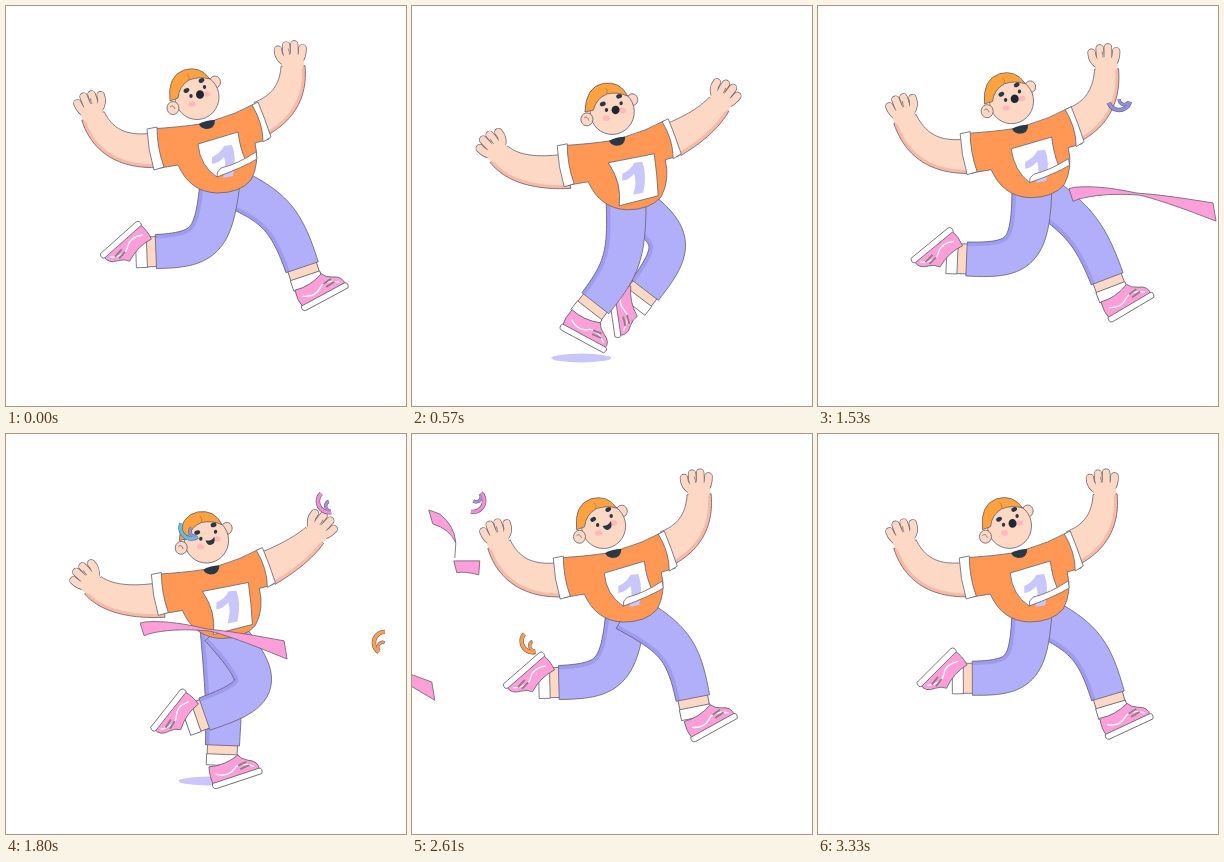
These frames come from a looping animation (400x400 px, 3.36 s). An HTML page with a canvas:

```html
<!DOCTYPE html>
<html lang="en">
<head>
<meta charset="utf-8">
<title>Finish line runner</title>
<style>
html, body { margin: 0; width: 100%; height: 100%; overflow: hidden; background: #fff; }
canvas { display: block; width: 400px; height: 400px; }
</style>
</head>
<body>
<canvas id="stage" width="400" height="400"></canvas>
<script>
const ctx = document.getElementById('stage').getContext('2d');
const LOOP = 3360, STEP = 30, TAU = Math.PI * 2, RAD = Math.PI / 180;
const LINE = '#62606f', SKIN = '#fdd8c5', SKIN_SHADE = '#f8b9a6', ORANGE = '#ff9855',
  HAIR = '#ffa23f', PANTS = '#b1affa', PANTS_SHADE = '#9f9cf0', PINK = '#ff9fda',
  LILAC = '#c9c6fc', NAVY = '#293847';

// Time to steps taken: a fast run, slow motion through the ribbon, then fast again.
const PACE = [[0, 0], [1260, 3.5], [1530, 4.17], [2130, 4.78], [2610, 5.08],
  [3120, 5.45], [3240, 5.7], [3360, 6]];

const mix = (a, b, k) => a + (b - a) * k;
const mixPoint = (a, b, k) => [mix(a[0], b[0], k), mix(a[1], b[1], k)];
const clamp = k => Math.max(0, Math.min(1, k));
// Wave over the two-step cycle: n periods, peaking at q = peak.
const wave = (q, n, peak) => Math.cos(Math.PI * n * (q - peak));

function along(keys, t) {
  const i = keys.findIndex((key, j) => j && t <= key[0]);
  const [a, b] = [keys[i - 1], keys[i]];
  return mix(a[1], b[1], (t - a[0]) / (b[0] - a[0]));
}

function scrollAt(t) {
  const d = t - 1530;
  return d < 600 ? d * .433 : 260 + (d - 600) * .24;
}

function paint(fill, stroke = LINE, width = .8) {
  if (fill) { ctx.fillStyle = fill; ctx.fill(); }
  if (stroke) { ctx.strokeStyle = stroke; ctx.lineWidth = width; ctx.stroke(); }
}
function shape(path, fill, stroke, width = .8) {
  const p = new Path2D(path);
  if (fill) { ctx.fillStyle = fill; ctx.fill(p); }
  if (stroke) { ctx.strokeStyle = stroke; ctx.lineWidth = width; ctx.stroke(p); }
}
function poly(points, fill, stroke) {
  ctx.beginPath();
  points.forEach(p => ctx.lineTo(p[0], p[1]));
  ctx.closePath();
  paint(fill, stroke);
}
function oval(x, y, rx, ry, fill, stroke = null, turn = 0) {
  ctx.beginPath();
  ctx.ellipse(x, y, rx, ry, turn, 0, TAU);
  paint(fill, stroke);
}
function box(x, y, w, h, fill) {
  ctx.beginPath();
  ctx.rect(x, y, w, h);
  paint(fill);
}
function placed(x, y, angle, draw) {
  ctx.save();
  ctx.translate(x, y);
  ctx.rotate(angle);
  draw();
  ctx.restore();
}

// Tapered limb around a cubic curve, shaded along one edge.
function tube([a, b, c, d], w0, w1, fill, shade, side, shadeWidth) {
  const rows = [];
  for (let i = 0; i <= 28; i++) {
    const t = i / 28, u = 1 - t;
    const pt = k => u * u * u * a[k] + 3 * u * u * t * b[k] + 3 * u * t * t * c[k] + t * t * t * d[k];
    const slope = k => u * u * (b[k] - a[k]) + 2 * u * t * (c[k] - b[k]) + t * t * (d[k] - c[k]);
    const dx = slope(0), dy = slope(1), len = Math.hypot(dx, dy) || 1;
    rows.push({ x: pt(0), y: pt(1), nx: -dy / len, ny: dx / len, r: mix(w0, w1, t) / 2 });
  }
  const edge = (sign, inset = 0) =>
    rows.map(p => [p.x + sign * p.nx * (p.r - inset), p.y + sign * p.ny * (p.r - inset)]);
  const outline = edge(1).concat(edge(-1).reverse());
  poly(outline, fill, null);
  poly(edge(side).concat(edge(side, shadeWidth).reverse()), shade, null);
  poly(outline, null, LINE);
}

// Gait of one leg; q = 0 is full reach forward, q = 1 full reach back.
function gait(q, bob, shortReach) {
  const reach = Math.max(0, wave(q, 1, 0)) ** 3 * shortReach;
  const hip = [214, 187 + bob];
  const cuff = [
    215 + 75 * wave(q, 1, 0) + 8 * wave(q, 2, 0) + 6 * wave(q, 3, .2) - reach,
    263 + bob + 14 * wave(q, 1, .22) - 13 * wave(q, 2, -.04) - 5 * wave(q, 3, .1) + 3 * wave(q, 4, 0)
  ];
  const bend = 34 - 22 * wave(q, 1, .35) + 10 * wave(q, 3, .75);
  const dx = cuff[0] - hip[0], dy = cuff[1] - hip[1], len = Math.hypot(dx, dy);
  const middle = mixPoint(hip, cuff, .5);
  const knee = [middle[0] + dy / len * bend, middle[1] - dx / len * bend];
  const turn = 55 - 88 * wave(q, 1, 0) - 45 * wave(q, 1, .5) + 14 * wave(q, 3, .13);
  return { hip, knee, cuff, turn };
}

function shoe() {
  shape('M-15 4 Q-18 14 -16 23 L32 23 Q34 14 24 10 Q18 7 16 2 Q0 8 -15 4Z', PINK, LINE);
  shape('M-11 13 Q0 20 8 14 T28 18', null, '#fff', 1.3);
  shape('M13 12 L22 11 M14 16 L24 15', null, '#8b7c84', 1.8);
  shape('M-17 21 L32 21 Q36 22 33 27 L-15 27 Q-19 26 -17 21Z', '#fff', LINE);
}

function leg({ hip, knee, cuff, turn }) {
  const low = mixPoint(cuff, knee, .85);
  const dir = Math.atan2(cuff[1] - low[1], cuff[0] - low[0]);
  placed(...cuff, dir, () => {
    box(-2, -15, 14, 30, SKIN);
    box(9, -15.5, 11, 31, '#fff');
  });
  placed(cuff[0] + Math.cos(dir) * 13, cuff[1] + Math.sin(dir) * 13, turn * RAD, shoe);
  tube([[hip[0], hip[1] - 11], mixPoint(hip, knee, .85), low, cuff], 40, 34, PANTS, PANTS_SHADE, 1, 4);
}

function arm(shoulder, bend, wrist, side) {
  const c = [shoulder[0] + bend[0], shoulder[1] + bend[1]];
  const dir = Math.atan2(wrist[1] - c[1], wrist[0] - c[0]);
  placed(...wrist, dir, () => {
    ctx.scale(1, side);
    ctx.lineCap = 'round';
    for (const [w, color] of [[8.4, LINE], [7, SKIN]])
      for (let i = 0; i < 4; i++) {
        const v = -10 + i * 8.2, u = 23 - Math.abs(i - 1.4) * 4;
        shape(`M4 ${v * .5} Q${u * .5} ${v} ${u} ${v}`, null, color, w);
      }
    shape('M8 7 Q9 1 17 4', null, LINE, .7);
    ctx.lineCap = 'butt';
  });
  tube([shoulder, mixPoint(shoulder, c, 2 / 3), mixPoint(wrist, c, 2 / 3), wrist],
    35, 24, SKIN, SKIN_SHADE, -side, 3.5);
  oval(wrist[0] + Math.cos(dir) * 3, wrist[1] + Math.sin(dir) * 3, 9, 11.2, SKIN, null, dir);
}

// Paper number that flaps between flat (k = 0) and rolled up (k = 1).
function bib(k) {
  const p = (x0, y0, x1, y1) => mixPoint([x0, y0], [x1, y1], k);
  const right = p(242, 173, 239, 153), left = p(203, 183, 211, 171);
  const tl = p(192, 140, 192, 138), tr = p(238, 131, 232, 126);
  shape(`M${tl} L${tr} Q${p(241, 152, 234, 142)} ${right} L${left} Q${p(206, 160, 194, 160)} ${tl}Z`, '#fff', LINE);
  shape('M206 151 Q215 147 218 140 L226 139 Q231 152 227 170 L217 172 Q221 160 218 151 Q213 157 206 158Z', LILAC);
  if (k < .15) return;
  const lift = 9 * k, end = p(243, 172, 251, 153);
  shape(`M${left} Q${left[0] - 1} ${left[1] - lift * .6} ${left[0] + 4} ${left[1] - lift}
    Q232 ${mix(172, 158, k)} ${end[0] - 1} ${end[1] - lift * .8} L${end}
    Q238 ${mix(178, 161, k)} ${left}Z`, '#fff', LINE);
}

function shirt(curl) {
  shape(`M143 123 Q176 121 194 118 L209 114 Q230 108 248 98 L263 133 L249 137
    Q254 157 245 174 Q234 187 211 187 Q184 186 172 159 L148 163Z`, ORANGE, LINE);
  shape('M193 118 Q200 114 209 114 Q209 123 200 123 Q194 122 193 118Z', NAVY);
  shape('M141 123 L151 121 Q151 142 158 161 L148 164 Q142 144 141 123Z', '#fff', LINE);
  shape('M246 99 L252 96 Q259 113 265 131 L257 136 Q257 117 246 99Z', '#fff', LINE);
  bib(curl);
}

function head(x, y, tilt, happy) {
  placed(192 + x, 91 + y, tilt, () => {
    ctx.translate(-192, -91);
    oval(209, 76, 5.5, 6, SKIN, LINE);
    oval(191, 91, 22, 22.5, SKIN, LINE);
    shape('M164 95 Q161 70 178 64 Q194 59 204 73 Q193 70 183 74 Q173 80 172 92Z', HAIR, LINE);
    shape('M181 68 Q184 70 183 74', null, '#ba7540');
    oval(167, 102, 6, 6.5, SKIN, LINE);
    shape('M164 101 Q167 98 169 103', null, LINE, .7);
    for (const [dx, dy] of [[0, 0], [15, -10]]) {
      oval(186 + dx, 98 + dy, 3.6, 2.8, '#ffb9bd');
      oval(180.5 + dx, 84.5 + dy, 3, 2.2, NAVY, null, -.5);
      oval(185 + dx * .9, 90 + dy * .9, 1.7, 2, NAVY);
    }
    if (happy) shape('M190 91 Q196 91 198 86 Q201 93 195 95 Q192 95 190 91Z', NAVY);
    else oval(194, 88.5, 4, 4.3, '#202631');
  });
}

function ribbon(scroll) {
  const top = [], bottom = [], fall = Math.max(0, scroll - 260) / 6;
  for (let i = 0; i <= 24; i++) {
    const s = i / 24, x = mix(251, 398, s) - scroll;
    const y = mix(189 + scroll * .055, 206 + scroll * .085 + fall, s) - 9 * Math.sin(Math.PI * s ** .75);
    const half = 6.5 * Math.abs(s - .47) / .53 + .6 + 2 * s * s;
    top.push([x - 3 * s, y - half]);
    bottom.unshift([x + 4 * (1 - s), y + half]);
  }
  poly(top.concat(bottom), PINK, LINE);
}

function scrap(scroll) {
  const left = 375 - scroll;
  placed(42 + left, 107 + left * .42, left * .004, () => {
    const size = Math.max(.1, 1 - Math.abs(left) / 190);
    ctx.scale(size, size);
    shape('M-25 -31 L-14 -27 Q1 -15 2 2 Q-4 -12 -21 -17Z', PINK, LINE);
    shape('M2 2 L1 17', null, LINE);
    shape('M0 20 L26 20 L25 34 Q10 30 3 32Z', PINK, LINE);
  });
}

function streamer(x, y, turn, color, accent) {
  placed(x, y, turn, () => {
    for (const [w, a, b] of [[4.4, LINE, LINE], [3.2, color, accent]]) {
      ctx.beginPath(); ctx.arc(0, -2, 11, .15, 2.7); paint(null, a, w);
      ctx.beginPath(); ctx.arc(5, -2, 5, .3, 3.1); paint(null, b, w * .75);
    }
  });
}

function shadow(phase, x) {
  const s = phase % 1;
  if (s < .28 || s > .62) return;
  const size = Math.min(1, (s - .24) / .12);
  oval(x - 14, phase % 2 > 1 ? 352 : 347, 30 * size, 4.4 * size, LILAC);
}

function draw(t) {
  ctx.clearRect(0, 0, 400, 400);
  ctx.lineJoin = 'round';
  const phase = along(PACE, t), scroll = scrollAt(t);
  const bob = 9 - 9 * wave(phase, 2, 0);
  const drop = (bob / 18) ** 2;
  const near = gait(phase + 1, bob, 18), far = gait(phase, bob, 0);
  const party = t >= 1180 && t <= 3240;

  shadow(phase, phase % 2 > 1 ? near.cuff[0] : far.cuff[0]);
  if (party && t > 2190) scrap(scroll);
  leg(far);
  leg(near);
  arm([152 + bob * .3, 144 + bob * 1.25], [-50, 5], [87, 110 + 44 * drop], 1);
  arm([256 + bob * .3, 112 + bob * 1.3], [32, -16], [287 + 23 * drop, 60 + 44 * drop], -1);
  placed(bob * .25, bob, 0, () => shirt(clamp(1 - drop * 1.2)));
  head(bob * .55, bob * .9, bob * .5 * RAD, t >= 1700 && t < 2900);
  if (party) {
    const spin = scroll / 120;
    ribbon(scroll);
    streamer(301 - scroll, 95, .1 + spin * .75, scroll < 100 ? '#8f91df' : '#62bdec', '#8f91df');
    streamer(438 - scroll, 68, 2.2 - spin, '#f58fd4', '#a58ee2');
    streamer(494 - scroll, 208, 2.4 - spin * .4, '#ffa04f', '#ef9a57');
  }
}

function frame() {
  draw(Math.floor(performance.now() % LOOP / STEP) * STEP);
  requestAnimationFrame(frame);
}
frame();
</script>
</body>
</html>
```
